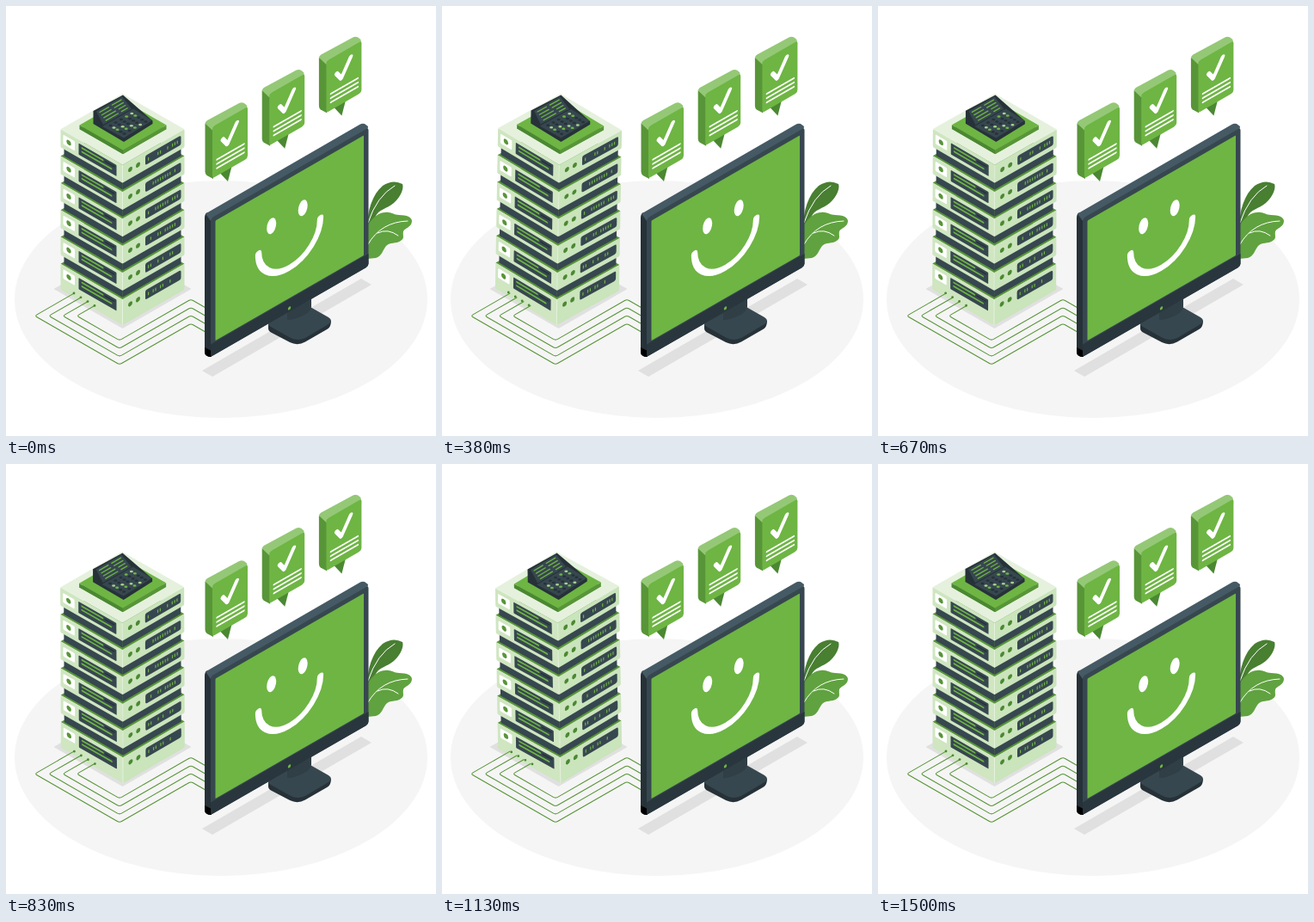
Write an HTML page that moves like this. It is 500 by 500 pixels and loops after 1540 ms.

```html
<!DOCTYPE html>
<html lang="en">
<head>
<meta charset="utf-8">
<title>Server and monitor</title>
<style>
html, body { margin: 0; width: 100%; height: 100%; overflow: hidden; background: #fff; }
svg { display: block; width: 100vw; height: 100vh; }
</style>
</head>
<body>
<svg id="stage" viewBox="0 0 500 500"></svg>
<script>
const GREEN = '#6eb544', DEEP = '#4b8832', MID = '#589538', PALE = '#94c876';
const SLATE = '#37474f', DARK = '#263238', STEEL = '#455a64', GREY = '#e0e0e0';
const LEFT = '#cfe6c1', RIGHT = '#cae4bc', TOP = '#e5f1dd';
const K = .575; // isometric slope
const LOOP = 1540, SWAY = 1500, STEP = 1000 / 24;

const path = (d, fill) => `<path d="${d}" fill="${fill}"/>`;
const line = (d, color, width) =>
  `<path d="${d}" fill="none" stroke="${color}" stroke-width="${width}" stroke-linecap="round" stroke-linejoin="round"/>`;
const rect = (x, y, w, h, fill, r = 0) =>
  `<rect x="${x}" y="${y}" width="${w}" height="${h}" rx="${r}" fill="${fill}"/>`;
const dot = (x, y, rx, ry, fill) => `<ellipse cx="${x}" cy="${y}" rx="${rx}" ry="${ry}" fill="${fill}"/>`;
const diamond = (x, y, r, fill) =>
  path(`M${x - r} ${y} L${x} ${y - r * K} L${x + r} ${y} L${x} ${y + r * K}Z`, fill);
const times = (n, f) => Array.from({ length: n }, (_, i) => f(i)).join('');

// Groups lying in a vertical plane; slope > 0 faces left, < 0 faces right
const plane = (slope, x, y, body) => `<g transform="matrix(1 ${slope} 0 1 ${x} ${y})">${body}</g>`;
const leftSide = (x, y, body) => plane(K, x, y, body);
const rightSide = (x, y, body) => plane(-K, x, y, body);
const shift = (x, y, body) => plane(0, x, y, body);

let seed = 7;
const random = () => (seed = seed * 16807 % 2147483647) / 2147483647;

function ground() {
  return dot(250, 341, 240, 138, '#f5f5f5') +
    path('M228 424 L240 431 L425 324 L413 317Z', GREY) +
    diamond(135.5, 329, 80, GREY);
}

function plant() {
  return path('M420 258 C420 238 426 219 438 209 Q450 201 461 207 C463 212 459 222 451 229 C443 236 433 236 429 246Z', '#487f31') +
    line('M421 252 Q431 221 452 209', '#fff', 1) +
    path('M420 294 V256 Q430 240 441 240 C447 239 451 243 457 243 Q471 243 472 250 C472 257 464 258 462 262 C461 267 464 270 459 273 C453 277 447 274 442 279 C438 284 437 291 430 293Z', '#60a23f') +
    line('M421 277 Q436 251 467 250 M432 264 Q444 258 456 267', '#fff', 1);
}

function wire(i) {
  const x = 33.5 + 16.3 * i, y = 360.3, end = 79 + 8 * i;
  const low = y + (132 - x) * K, peak = low - 83 * K, r = 2.5, s = r * K;
  return line(`M${end} ${y - (end - x) * K} L${x + r} ${y - s} Q${x} ${y} ${x + r} ${y + s}` +
    `L${132 - r} ${low - s} Q132 ${low} ${132 + r} ${low - s}` +
    `L${215 - r} ${peak + s} Q215 ${peak} ${215 + r} ${peak + s} l20 ${20 * K}`, MID, 1.1);
}

function unit(n) {
  const w = 72, h = n === 5 ? 30 : 21;
  const badge = rect(3, 4.6, 13.5, 11, '#fff', 1.2) + dot(9.5, 10.1, 2.7, 2.9, MID);
  const slot = rect(21, 4.2, 44, 13.2, SLATE, .8) +
    line('M25 7.6 H49 M25 12 H59', GREEN, 1.9) + line('M52 7.6 H62', DARK, 1.7);
  const lamps = dot(9, 10.4, 2.5, 2.7, DEEP) + dot(18, 10.4, 2.5, 2.7, DEEP);
  const ports = rect(26.5, 4.8, 41.5, 11, SLATE, 2) +
    times(13, i => random() < .6 ? rect(29.5 + i * 2.8, 8.6, 1.2, 3.6, GREEN) : '');
  return diamond(135.5, 143.3, w, n ? MID : TOP) +
    leftSide(63.5, 143.3, rect(0, 0, w, h, LEFT, 1.2) + badge + slot) +
    rightSide(135.5, 143.3 + w * K, rect(0, 0, w, h, RIGHT, 1.2) + lamps + ports) +
    line(`M135.5 185 v${h - 1}`, TOP, 1);
}

// Narrow dark core that carries the unit above
function core() {
  const w = 68, y = 159;
  return leftSide(67.5, y, rect(0, 0, w, 15.5, SLATE)) +
    rightSide(135.5, y + w * K, rect(0, 0, w, 15.5, SLATE));
}

function terminal() {
  const plate = diamond(136, 143, 50.5, MID) +
    leftSide(85.5, 138.5, rect(0, 0, 50.5, 4.8, DEEP)) +
    rightSide(136, 138.5 + 50.5 * K, rect(0, 0, 50.5, 4.8, MID)) +
    diamond(136, 138.5, 50.5, GREEN);
  const body = path('M101.500 122 L136 103.500 L170.500 133.500 V137 L137 158 L101.500 137Z', DARK) +
    path('M112 140 L148 119.500 L170 133 L137 153.500Z', SLATE) +
    path('M105 122.500 L135 105.500 L146 119.500 L113 138Z', SLATE);
  const text = times(4, i => {
    const x = 109 + i * 2.4, y = 123.500 + i * 3.2, cut = 8 + 7 * random();
    return line(`M${x} ${y} l${cut} ${-cut * K} m4 ${-4 * K} L${x + 25} ${y - 25 * K}`, GREEN, 1.3);
  });
  const tones = [DARK, GREEN, DARK, '#a9d18f', DARK];
  const keys = times(25, i => {
    const u = i % 5, v = Math.floor(i / 5);
    return dot(121.500 + u * 6.2 + v * 4, 139 - u * 3.5 + v * 2.4, 2, 1.25, tones[(u * 2 + v * 3) % 5]);
  });
  return plate + body + text + keys;
}

function server() {
  return times(6, i => {
    const n = 5 - i;
    return shift(0, n * 31.3, (n < 5 ? core() : '') + unit(n));
  }) + terminal();
}

function monitor() {
  const w = 183.5, h = 161;
  const stand = path('M305 370 V375 Q305 378 309 380 L330 391 Q339 395.500 348 390.500 L374 375.500 Q378 373 378 366Z', DARK) +
    path('M308 366 L345 345 L375 362 Q381 366 375 370 L348 386 Q339 390 331 386 L308 373 Q302 370 308 366Z', SLATE) +
    path('M327 354 L355 338 V350 Q353 357 345 360 Q335 365 327 365Z', '#303e46');
  const shell = path('M231 246 Q231 242 234 240 L239 246 V408 Q231 408 231 402Z', DARK) +
    path('M231 397 L239 401 V408 Q231 408 231 402Z', '#000') +
    path('M232 241.500 L411 138 Q414 136 417 137 L421 140 L420 146 L238 250Z', STEEL);
  const face = dot(70.7, 49.4, 5.5, 9, '#fff') + dot(107.2, 49.4, 5.5, 9, '#fff') +
    line('M55.5 73 A36 37 0 0 0 127.500 73', '#fff', 7.3);
  const front = rect(0, 0, w, h, SLATE, 3) +
    path(`M0 146.500 H${w} V${h - 3} q0 3 -3 3 H3 q-3 0 -3 -3Z`, '#29363d') +
    rect(5.5, 5.8, 172.5, 139.5, GREEN, 1) + dot(91.5, 157, 1.7, 1.9, GREEN) + face;
  return stand + shell + rightSide(238, 247, front);
}

function bubble(i) {
  const tail = path('M9 54 L14 49 L18 63.500Z', DEEP) + path('M12 52 L22.500 46 L18 63.500Z', DEEP);
  const shell = path('M-8.500 -4 L1 1 V60.500 L-6.500 56.500 Q-8.500 55 -8.500 52Z', MID) +
    path('M-8.500 -4 Q-8 -6.500 -6 -7.500 L31 -27.500 Q34 -29 37 -27.500 L40 -25 L41 -20 L0 4Z', PALE);
  const front = rect(0, 0, 41, 60, GREEN, 3) +
    line('M12 21.400 L17.500 30 L28.500 11.400', '#fff', 4.8) +
    times(3, k => line(`M5.3 ${41 + k * 5} H36.700`, '#fff', 2));
  return shift(240 + i * 66.2, 140.5 - i * 38.2, tail + shell + rightSide(0, 0, front));
}

document.getElementById('stage').innerHTML =
  ground() + plant() + '<g id="server">' + server() + '</g>' + times(4, wire) +
  '<g id="plugs">' + times(4, i => dot(79 + 8 * i, 334 + 4.8 * i, 1.4, 1.4, DEEP)) + '</g>' +
  monitor() + times(3, bubble);

const parts = ['server', 'plugs'].map(id => document.getElementById(id));

// Linear sway: 0, +1, 0, -1, 0 degrees
function tilt(t) {
  const p = t / SWAY * 4 % 4;
  return p < 1 ? p : p < 3 ? 2 - p : p - 4;
}

function draw(now) {
  const t = Math.floor((now % LOOP + 5) / STEP) * STEP;
  const turn = `rotate(${tilt(t).toFixed(4)} 135.5 236.5)`;
  parts.forEach(g => g.setAttribute('transform', turn));
}

let start;
function tick(now) {
  start ??= now;
  draw(now - start);
  requestAnimationFrame(tick);
}
draw(0);
requestAnimationFrame(tick);
</script>
</body>
</html>
```
